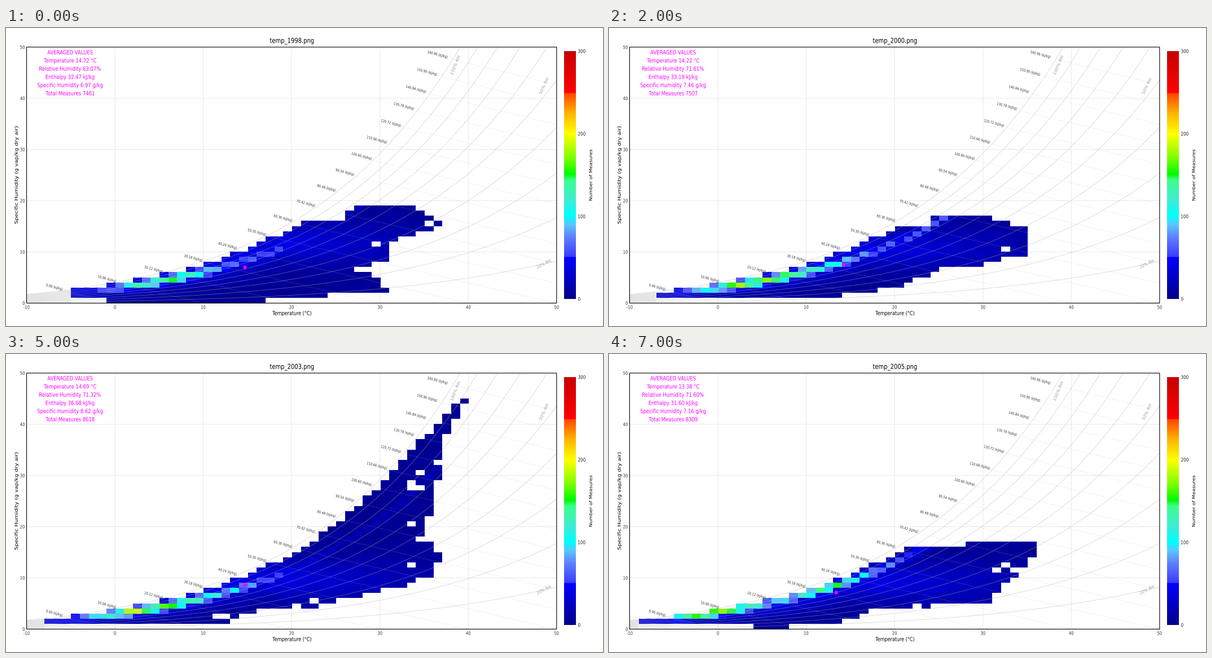
These frames come from a looping animation (1058x529 px, 8000 ms). A matplotlib script:

```python
import numpy as np
import matplotlib.pyplot as plt
from matplotlib.animation import ArtistAnimation
from matplotlib.colors import LinearSegmentedColormap
from matplotlib.patches import Ellipse, PathPatch, Polygon, Rectangle
from matplotlib.textpath import TextPath
from matplotlib.transforms import Affine2D

W, H = 1058, 529
LEFT, RIGHT, TOP, BOTTOM = 36.5, 975.8, 33.9, 488.4
ASPECT = 0.82  # the whole chart is narrowed by this factor
PRESSURE = 943.0  # hPa
MAGENTA = "#ff00ff"
HEAT_T = (-7, -2, 2, 7, 12, 18, 24)  # temperatures of the ridge heights

STOPS = [(0, "#00008b"), (50, "#0000ff"), (51, "#3c3cff"), (75, "#5f82ff"),
         (90, "#5ac8ff"), (100, "#00ffff"), (120, "#40ebd2"),
         (144, "#3cff8c"), (151, "#00fa00"), (170, "#78ff00"),
         (200, "#ffff00"), (225, "#ffb400"), (249, "#ff4600"),
         (250, "#ff0000"), (300, "#c80000")]
CMAP = LinearSegmentedColormap.from_list(
    "measures", [(v / 300, c) for v, c in STOPS], N=600)


def px(t):
    return LEFT + (np.asarray(t) + 10) * (RIGHT - LEFT) / 60


def py(w):
    return BOTTOM - np.asarray(w) * (BOTTOM - TOP) / 50


def humidity(t, rh=1.0):
    """Specific humidity in g/kg at temperature t."""
    t = np.asarray(t, float)
    e = rh * np.where(t < 0, 6.112 * np.exp(22.46 * t / (272.62 + t)),
                      6.112 * np.exp(17.62 * t / (243.12 + t)))
    return 622 * e / (PRESSURE - e)


def enthalpy(t, w):
    return 1.006 * t + w * (2.501 + 0.00186 * t)


fig = plt.figure(figsize=(W / 100, H / 100), dpi=100, facecolor="white")
ax = fig.add_axes([0, 0, 1, 1])
ax.axis("off")


def text(x, y, s, size, color="black", rot=0, ha=0.5):
    """Text centred on y; ha is the part of its width left of x."""
    path = TextPath((0, 0), s, size=size)
    box = path.get_extents()
    move = (Affine2D().translate(-box.x0 - ha * box.width, -0.365 * size)
            .rotate_deg(rot).scale(ASPECT, -1).translate(x, y))
    return ax.add_patch(PathPatch(move.transform_path(path), fc=color, lw=0,
                                  zorder=6))


def line(x, y, color, lw=0.7, **style):
    return ax.plot(x, y, color=color, lw=lw, snap=False, **style)[0]


def draw_chart():
    for v in range(0, 50, 10):
        line([px(v)] * 2, [TOP, BOTTOM], "#e8e8e8", zorder=1)
        line([LEFT, RIGHT], [py(v)] * 2, "#e8e8e8", zorder=1)
    for v in range(-10, 51, 10):
        text(px(v), 495.5, str(v), 8.3, "#333333")
        if v >= 0:
            text(33, py(v), str(v), 8.3, "#333333", ha=1)

    frame = Rectangle((LEFT, TOP), RIGHT - LEFT, BOTTOM - TOP, fill=False,
                      ec="black", lw=0.8, snap=False, zorder=5)
    ax.add_patch(frame)

    t = np.linspace(-10, 50, 300)
    for rh in range(10, 101, 10):
        curve = line(px(t), py(humidity(t, rh / 100)), "#b0b0b0", 0.6,
                     alpha=0.5, zorder=3)
        curve.set_clip_path(frame)
    text(796, 66, "100% RH", 8.2, "#a0a0a0", 63)
    text(953, 103, "50% RH", 8.2, "#a0a0a0", 60)
    text(953, 418.5, "10% RH", 8.2, "#a0a0a0", 22)

    for h in 10.06 * np.arange(17):
        t0 = np.interp(h, enthalpy(t, humidity(t)), t)
        w0 = humidity(t0)
        t1 = min(h / 1.006, 50)
        w1 = (h - 1.006 * t1) / (2.501 + 0.00186 * t1)
        line(px([t0, t1]), py([w0, w1]), "#c0c0c0", 0.8, alpha=0.45, ls=":",
             zorder=3)
        text(px(t0) - 13 - 14 * (h / 161) ** 1.5, py(w0) - 6.5 - h / 70,
             f"{h:.2f} (kJ/kg)", 6.4, "#333333", -12)

    text(506.5, 506, "Temperature (°C)", 9.8)
    text(18, 261, "Specific Humidity (g vap/kg dry air)", 9.8, rot=90)
    text(1036, 261, "Number of Measures", 8.85, rot=90)
    ax.imshow(np.linspace(300, 0, 600)[:, None], cmap=CMAP, vmin=0, vmax=300,
              extent=(988.5, 1009.5, 481, 41), aspect="auto", zorder=2)
    for v in range(0, 301, 100):
        text(1014, 481 - v * 440 / 300, str(v), 8.8, "#222222", ha=0)


def cells(year, left, edge, crest, peak, ridge, heat, dry=0):
    """Counts per cell, NaN where nothing was measured.

    edge: (row, end column) points of the dry side; crest: row and column
    where the top leaves the saturation curve; ridge: relative humidity of
    the hottest cells; heat: their counts at HEAT_T.
    """
    rng = np.random.default_rng(year)
    col = np.arange(-10, 50)
    t, w = col + 0.5, np.arange(50)[:, None] + 0.5
    sat = humidity(t)

    fade = np.clip(1.2 - (t - 14) / 22, 0.1, 1)
    spread = 0.9 + 0.095 * (t + 10)
    mid = np.minimum(0.8 * sat, peak)
    count = 4 + 34 * fade * np.exp(-((w - mid) / spread) ** 2)
    count += rng.normal(0, 1.5, count.shape)
    hot = np.interp(t, HEAT_T, heat) * rng.uniform(0.9, 1.1, 60)
    hot = hot * np.exp(-((w - ridge * sat) / 0.85) ** 2)
    count = np.clip(np.maximum(count, hot), 1, 300)

    top = np.floor(humidity(col) + np.maximum(0.34 - 0.013 * col, 0.1))
    rows, ends = zip(*edge)
    grid = np.full((50, 60), np.nan)
    for row in range(rows[0], rows[-1] + 1):
        start = left if row == 1 else col[np.argmax(top > row)]
        if row == 0:
            start = dry
        elif row >= crest[0]:
            start = max(start, crest[1] + (row - crest[0]) // 2)
        end = int(round(np.interp(row, rows, ends)))
        used = (col >= start) & (col < end)
        used &= (col < end - 3) | (rng.random(60) > 0.1)
        grid[row, used] = count[row, used]
    return grid


def year_artists(year, stats, left, **shape):
    temp, rh, enth, spec, total = stats
    grid = np.ma.masked_invalid(cells(year, left, **shape))
    items = [ax.imshow(grid, cmap=CMAP, vmin=0, vmax=300, origin="lower",
                       extent=(LEFT, RIGHT, BOTTOM, TOP), aspect="auto",
                       interpolation="nearest", zorder=2)]
    t = np.linspace(-10, left, 12)
    wedge = np.column_stack([px(t), py(humidity(t))])
    base = [(px(left), BOTTOM - 1), (LEFT, BOTTOM - 1)]
    items.append(ax.add_patch(Polygon(np.vstack([wedge, base]), fc="#f5f5f5",
                                      lw=0, zorder=1.5)))
    items.append(text(506.5, 22, f"temp_{year}.png", 12.2))
    lines = ["AVERAGED VALUES", f"Temperature {temp:.2f} °C",
             f"Relative Humidity {rh:.2f}%", f"Enthalpy {enth:.2f} kJ/kg",
             f"Specific Humidity {spec:.2f} g/kg", f"Total Measures {total}"]
    for i, s in enumerate(lines):
        items.append(text(113.5, 43 + 14.55 * i, s, 10.3, MAGENTA))
    items.append(ax.add_patch(Ellipse((px(temp), py(spec)), 6, 7, fc=MAGENTA,
                                      lw=0, zorder=7)))
    return items


draw_chart()
frames = [
    year_artists(
        1998, (14.72, 63.07, 32.47, 6.97, 7461), left=-5, dry=-1,
        edge=[(0, 17), (2, 31), (6, 28), (8, 31), (11, 31), (15, 37),
              (18, 34)],
        crest=(16, 26), peak=11.5, ridge=0.73,
        heat=(10, 45, 120, 160, 75, 60, 20)),
    year_artists(
        1999, (14.46, 67.24, 32.80, 7.21, 7488), left=-6, dry=2,
        edge=[(0, 12), (2, 24), (6, 28), (11, 34), (14, 35), (16, 34)],
        crest=(15, 24), peak=11, ridge=0.73,
        heat=(20, 70, 145, 160, 95, 62, 40)),
    year_artists(
        2000, (14.22, 71.61, 33.19, 7.46, 7507), left=-7,
        edge=[(1, 14), (3, 21), (6, 25), (7, 30), (9, 35), (14, 35),
              (16, 31)],
        crest=(15, 24), peak=10.5, ridge=0.74,
        heat=(30, 85, 170, 170, 115, 65, 60)),
    year_artists(
        2001, (14.18, 77.12, 34.70, 8.07, 8012), left=-8,
        edge=[(1, 10), (2, 16), (6, 25), (9, 32), (14, 36), (19, 30)],
        crest=(17, 23), peak=10, ridge=0.78,
        heat=(30, 70, 150, 200, 150, 110, 40)),
    year_artists(
        2002, (14.06, 82.89, 36.20, 8.71, 8501), left=-8,
        edge=[(1, -2), (2, 12), (6, 25), (8, 32), (11, 32), (14, 37),
              (16, 37), (18, 31), (22, 32), (23, 30)],
        crest=(22, 26), peak=9.5, ridge=0.83,
        heat=(30, 60, 120, 255, 210, 190, 30)),
    year_artists(
        2003, (14.69, 71.32, 36.68, 8.62, 8618), left=-8,
        edge=[(1, 13), (3, 16), (4, 23), (9, 35), (13, 37), (19, 35),
              (31, 37), (36, 37), (44, 40)],
        crest=(38, 36), peak=9.5, ridge=0.73,
        heat=(40, 95, 190, 165, 105, 55, 20)),
    year_artists(
        2004, (13.87, 75.97, 34.45, 8.08, 8757), left=-7,
        edge=[(1, -4), (2, 15), (4, 18), (6, 25), (11, 33), (18, 33),
              (22, 36), (23, 36)],
        crest=(20, 27), peak=11, ridge=0.76,
        heat=(30, 95, 225, 190, 110, 75, 60)),
    year_artists(
        2005, (13.38, 71.60, 31.60, 7.16, 8309), left=-9, dry=4,
        edge=[(0, 10), (1, 14), (3, 17), (5, 31), (8, 32), (12, 35),
              (16, 36)],
        crest=(16, 28), peak=9, ridge=0.82,
        heat=(30, 170, 160, 80, 160, 80, 40)),
]

ax.set_xlim(0, W)
ax.set_ylim(H, 0)
anim = ArtistAnimation(fig, frames, interval=1000, repeat=True, repeat_delay=0)
plt.show()
```
